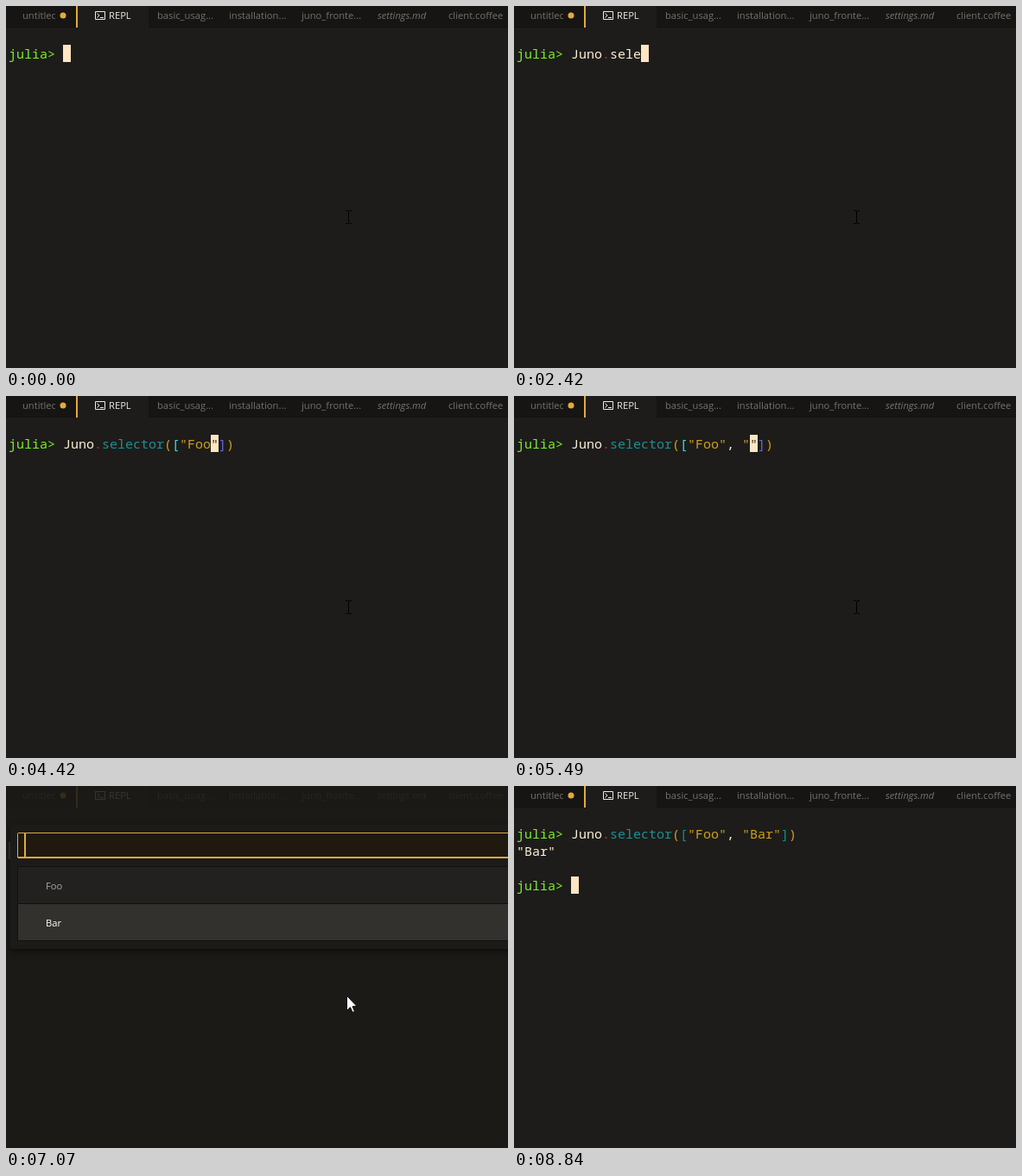
These frames come from a looping animation (581x420 px, 8.98 s). An HTML page with a canvas:

```html
<!DOCTYPE html>
<html lang="en">
<head>
<meta charset="utf-8">
<title>REPL selector</title>
<style>
html, body { margin: 0; width: 100%; height: 100%; overflow: hidden; background: #1d1c1a; }
canvas { display: block; }
</style>
</head>
<body>
<canvas id="stage" width="581" height="420"></canvas>
<script>
const ctx = document.getElementById('stage').getContext('2d', { alpha: false });
const LOOP = 8980;
const MONO = '15px "Noto Sans Mono", "DejaVu Sans Mono", monospace';
const UI = '11.2px "Open Sans", "Noto Sans", sans-serif';
const COLOR = {
  bg: '#1d1c1a', bar: '#161513', cream: '#fff0d6', cursor: '#ffe6c2', green: '#7cee2b',
  red: '#e8193f', blue: '#1f9095', gold: '#d0a01c', teal: '#15907f',
  open: '#3fdcd0', close: '#6668d8', amber: '#e3aa3c', tab: '#74726e'
};
const ENTER = 6320, OPEN = 6400, CARET = 7070, CLOSE = 7380, RESULT = 7460;

// Input line over time; "|" marks the cursor.
const typing = [
  [0, '|'], [530, 'J|'], [760, 'Ju|'], [830, 'Jun|'], [900, 'Juno|'], [1210, 'Juno.|'],
  [1520, 'Juno.s|'], [1810, 'Juno.sw|'], [2040, 'Juno.s|'], [2200, 'Juno.se|'],
  [2310, 'Juno.sel|'], [2420, 'Juno.sele|'], [2650, 'Juno.selector|'],
  [2960, 'Juno.selector(|)'], [3340, 'Juno.selector([|])'], [3800, 'Juno.selector(["|"])'],
  [4110, 'Juno.selector(["F|"])'], [4340, 'Juno.selector(["Fo|"])'],
  [4420, 'Juno.selector(["Foo|"])'], [4800, 'Juno.selector(["Foo"|])'],
  [5190, 'Juno.selector(["Foo",|])'], [5250, 'Juno.selector(["Foo", |])'],
  [5490, 'Juno.selector(["Foo", "|"])'], [5870, 'Juno.selector(["Foo", "B|"])'],
  [6100, 'Juno.selector(["Foo", "Ba|"])'], [6180, 'Juno.selector(["Foo", "Bar|"])'],
  [ENTER, 'Juno.selector(["Foo", "Bar"])']
];

function rect(x, y, w, h, color) {
  ctx.fillStyle = color;
  ctx.fillRect(x, y, w, h);
}

function label(text, x, y, color, font = UI) {
  ctx.font = font;
  ctx.fillStyle = color;
  ctx.fillText(text, x, y);
}

function mono(text, col, row, colorOf) {
  [...text].forEach((ch, i) => label(ch, 3 + 9 * (col + i), 61 + 20 * row, colorOf(ch, i), MONO));
}

function block(col, row) {
  rect(3 + 9 * col, 45 + 20 * row, 9, 20, COLOR.cursor);
}

function stroke(points, color, width = 1, closed = false) {
  ctx.beginPath();
  points.forEach(([x, y]) => ctx.lineTo(x, y));
  if (closed) ctx.closePath();
  ctx.strokeStyle = color;
  ctx.lineWidth = width;
  ctx.stroke();
}

function drawTabs() {
  rect(0, 0, 581, 25, COLOR.bar);
  rect(0, 24, 581, 1, '#121110');
  rect(83, 0, 82, 25, COLOR.bg);
  rect(81, 0, 2, 25, COLOR.amber);

  ctx.save();
  ctx.beginPath();
  ctx.rect(0, 0, 57, 25);
  ctx.clip();
  label('untitled', 19, 15, COLOR.tab);
  ctx.restore();
  ctx.fillStyle = COLOR.amber;
  ctx.beginPath();
  ctx.arc(66, 11, 3.5, 0, 7);
  ctx.fill();

  const white = '#eeebe5';
  stroke([[103.5, 6.5], [114.5, 6.5], [114.5, 15.5], [103.5, 15.5]], white, 1, true);
  stroke([[105.5, 8.5], [108, 11], [105.5, 13.5]], white);
  stroke([[109, 13.5], [113, 13.5]], white);
  label('REPL', 119, 15, white);
  label('basic_usag...', 175, 15, COLOR.tab);
  label('installation...', 258, 15, COLOR.tab);
  label('juno_fronte...', 342, 15, COLOR.tab);
  label('settings.md', 430, 15, COLOR.tab, 'italic ' + UI);
  label('client.coffee', 512, 15, COLOR.tab);
}

function inputColors(code, cursor, done) {
  const nested = code.includes('[');
  const called = code.includes('(');
  let quoted = false;
  return (ch, i) => {
    if (i === cursor) {
      if (ch === '"') quoted = !quoted;
      return '#3a3020';
    }
    if (ch === '"') {
      quoted = !quoted;
      return COLOR.gold;
    }
    if (quoted) return COLOR.gold;
    if (ch === '.') return COLOR.red;
    if (ch === '[') return done ? COLOR.teal : COLOR.open;
    if (ch === ']') return done ? COLOR.teal : COLOR.close;
    if (ch === '(') return nested ? COLOR.gold : COLOR.open;
    if (ch === ')') return COLOR.gold;
    return called && i > 4 && i < 13 ? COLOR.blue : COLOR.cream;
  };
}

function drawTerminal(t) {
  const line = typing.findLast(([start]) => t >= start)[1];
  const cursor = line.indexOf('|');
  const code = line.replace('|', '');
  const prompt = row => mono('julia>', 0, row, () => COLOR.green);
  prompt(0);
  if (cursor >= 0) block(7 + cursor, 0);
  mono(code, 7, 0, inputColors(code, cursor, t >= ENTER));
  if (t >= RESULT) {
    mono('"Bar"', 0, 1, () => COLOR.cream);
    prompt(3);
    block(7, 3);
  } else if (t >= ENTER) {
    block(0, 1);
  }
}

function drawSelector(t) {
  const progress = Math.min(1, (Math.floor((t - OPEN) / 75) + 1) / 5);
  ctx.globalAlpha = 0.87 * (1 - (1 - progress) ** 3);
  rect(0, 0, 581, 420, '#1b1a18');
  ctx.globalAlpha = 1;

  ctx.save();
  ctx.shadowColor = 'rgba(0,0,0,.5)';
  ctx.shadowBlur = 8;
  ctx.shadowOffsetY = 3;
  ctx.fillStyle = '#1c1b19';
  ctx.beginPath();
  ctx.roundRect(5, 45, 600, 144, 3);
  ctx.fill();
  ctx.restore();

  ctx.fillStyle = COLOR.amber;
  ctx.beginPath();
  ctx.roundRect(13, 54, 600, 30, 2);
  ctx.fill();
  rect(14, 55, 600, 27, '#1f190f');
  if (t >= CARET) rect(21, 55, 2, 27, COLOR.amber);

  rect(13, 93, 600, 87, '#11100f');
  rect(14, 94, 600, 42, '#22211f');
  rect(14, 137, 600, 42, '#32312d');
  label('Foo', 46, 120, '#aba5a5');
  label('Bar', 46, 163, '#ffffff');
}

function drawArrow() {
  const points = [[394.5, 243.5], [394.5, 260.5], [398.5, 256.8], [401, 262.5],
    [403.5, 261.5], [401, 255.8], [406, 255.5]];
  ctx.fillStyle = '#fff';
  ctx.beginPath();
  points.forEach(([x, y]) => ctx.lineTo(x, y));
  ctx.fill();
  stroke(points, '#111', 1, true);
}

function drawBeam(dx, dy) {
  ctx.save();
  ctx.translate(dx, dy);
  rect(396, 238, 1, 14, '#000');
  for (const y of [237, 252]) {
    rect(393, y, 3, 1, '#000');
    rect(397, y, 3, 1, '#000');
  }
  ctx.restore();
}

function draw(t) {
  rect(0, 0, 581, 420, COLOR.bg);
  drawTabs();
  drawTerminal(t);
  if (t >= OPEN && t < CLOSE) {
    drawSelector(t);
    drawArrow();
  } else if (t < 8700) {
    drawBeam(0, 0);
  } else if (t < 8770) {
    drawBeam(80, 56);
  } else if (t < 8840) {
    drawBeam(173, 123);
  }
}

const start = performance.now();
function tick() {
  draw((performance.now() - start) % LOOP);
  requestAnimationFrame(tick);
}
tick();
</script>
</body>
</html>
```
